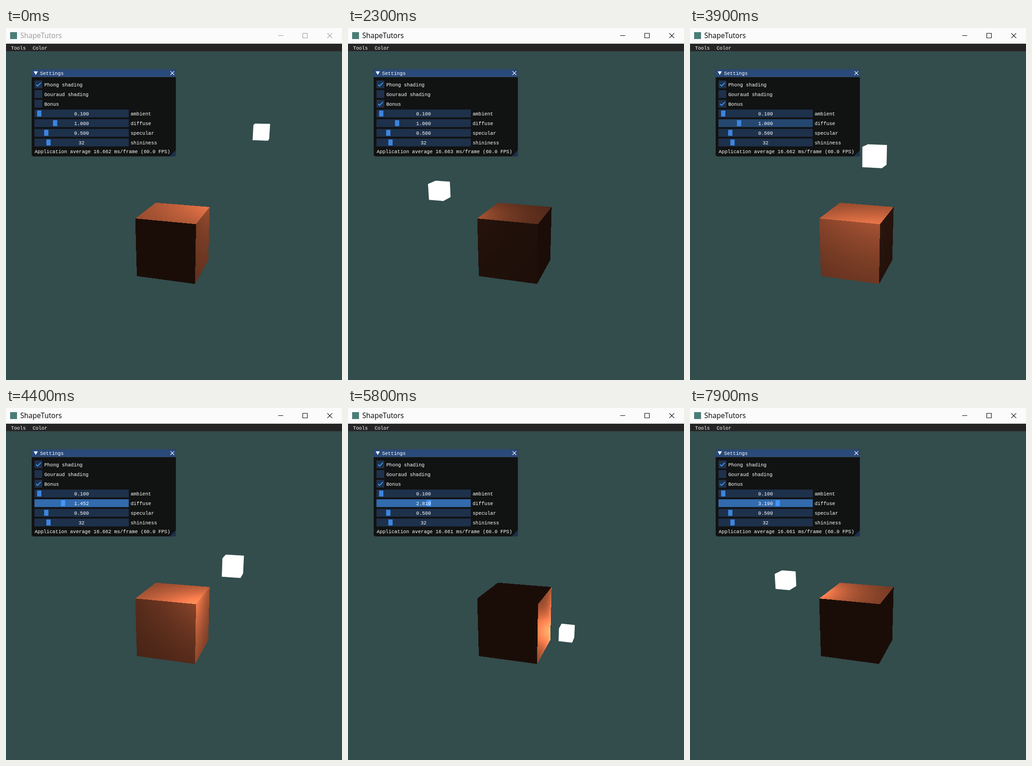
Recreate the animation shown at these times as an HTML page with a canvas. Size 732x765 px, loop 8 s.

```html
<!DOCTYPE html>
<html lang="en">
<head>
<meta charset="utf-8">
<title>Lighting demo</title>
<style>
html, body { margin: 0; width: 100%; height: 100%; overflow: hidden; background: #334c4c; }
canvas, svg { position: absolute; left: 0; top: 0; width: 732px; height: 765px; display: block; }
.mono { font: 10.7px "Liberation Mono", "DejaVu Sans Mono", monospace; fill: #fff; white-space: pre; }
.title { font: 15.5px "Open Sans", "Noto Sans", sans-serif; }
</style>
</head>
<body>
<canvas id="scene" width="732" height="765"></canvas>
<svg id="ui" viewBox="0 0 732 765">
  <rect width="732" height="34" fill="#fbfbfb"/>
  <rect x="9" y="9" width="15" height="15" fill="#4a7d78"/>
  <text id="caption" class="title" x="31" y="22">ShapeTutors</text>
  <path id="buttons" d="M593 16.5H604M646.5 11.5H656.5V21.5H646.5ZM700 11.3L710.6 21.9M710.6 11.3L700 21.9" fill="none" stroke-width="1.1"/>
  <rect y="34" width="732" height="17" fill="#242424"/>
  <path d="M0.5 51V34.5H732M0 50.5H732" fill="none" stroke="#34383c"/>
  <text class="mono" x="11" y="46.6">Tools</text>
  <text class="mono" x="58" y="46.6">Color</text>
  <rect x="55.5" y="89.5" width="315" height="190" rx="5" fill="#0f0f0f" fill-opacity=".94" stroke="#374350"/>
  <path d="M56 106.5V94.5Q56 90 60.5 90H365.5Q370 90 370 94.5V106.5Z" fill="#294a7a"/>
  <path d="M56 106.5H370" stroke="#36424f"/>
  <path d="M60.3 94.3H69.3L64.8 102Z" fill="#fff"/>
  <path d="M358.3 93.8L366.5 102M366.5 93.8L358.3 102" stroke="#fff" stroke-width="1.1"/>
  <path d="M370 265.5V276Q370 279 366 279H356.5Z" fill="#1c304c"/>
  <text class="mono" x="74.3" y="101.6">Settings</text>
  <g id="rows"></g>
  <text id="rate" class="mono" x="62.6" y="271.6"></text>
</svg>
<script>
const $ = id => document.getElementById(id);
const LOOP = 8000, STEP = 100;
const IDLE = '#1e314b', HOVER = '#25476f', ACTIVE = '#326bae';

// Settings panel rows
const checks = ['Phong shading', 'Gouraud shading', 'Bonus'];
const sliders = [['ambient', 0.1, 5], ['diffuse', 1, 5], ['specular', 0.5, 5], ['shininess', 32, 256]];
let rows = '';
checks.forEach((name, i) => {
  const y = 114 + 21 * i;
  rows += `<rect id="box${i}" x="62" y="${y}" width="17" height="17" fill="${IDLE}"/>
    <path id="tick${i}" d="M65.5 ${y + 9}L68.8 ${y + 12.2}L76 ${y + 4.8}" fill="none" stroke="#4296fa" stroke-width="1.9"/>
    <text class="mono" x="83.4" y="${y + 12.6}">${name}</text>`;
});
const grabX = (v, max) => 63.9 + 192 * v / max;
sliders.forEach(([name, v, max], i) => {
  const y = 177.3 + 21 * i;
  rows += `<rect id="bar${i}" x="62" y="${y}" width="205.5" height="17" fill="${IDLE}"/>
    <rect id="grab${i}" x="${grabX(v, max)}" y="${y + 2}" width="9.3" height="13" fill="#3d85e0"/>
    <text id="val${i}" class="mono" x="164.6" y="${y + 12.3}" text-anchor="middle">${max > 5 ? v : v.toFixed(3)}</text>
    <text class="mono" x="271.4" y="${y + 12.3}">${name}</text>`;
});
$('rows').innerHTML = rows;

// Camera
const FX = 881, FY = 885, CX = 366, CY = 400;
const yaw = 16.8 * Math.PI / 180, pitch = 16.5 * Math.PI / 180;
const [sy, cy, sp, cp] = [Math.sin(yaw), Math.cos(yaw), Math.sin(pitch), Math.cos(pitch)];
const right = [cy, 0, -sy];
const up = [-sy * sp, cp, -cy * sp];
const ahead = [-sy * cp, -sp, -cy * cp];
const dot = (a, b) => a[0] * b[0] + a[1] * b[1] + a[2] * b[2];
const blend = (r, u, d) => right.map((v, i) => v * r + up[i] * u + ahead[i] * d);
const eye = blend(-0.0031, 0.4865, -6.928);
const toWorld = (r, u, d) => blend(r, u, d).map((v, i) => v + eye[i]);
function project(p) {
  const q = p.map((v, i) => v - eye[i]), d = dot(q, ahead);
  return [CX + FX * dot(q, right) / d, CY - FY * dot(q, up) / d];
}

// Light path: a fixed spot, then a tilted orbit, in view coordinates
function lightView(t) {
  if (t < 1300) return [1.496, 1.3606, 6.92];
  const a = (90 + 0.0625 * (t - 4900)) * Math.PI / 180;
  const s = Math.sin(a), c = Math.cos(a);
  return [0.0027 + 1.1716 * s - 0.373 * c,
          -0.008 - 0.0954 * s + 0.8564 * c,
          6.62 - 0.33 * s - 1.498 * c];
}

// Piecewise linear value over time
function track(keys, t) {
  const i = keys.findIndex(k => k[0] > t);
  if (i < 0) return keys[keys.length - 1][1];
  if (i === 0) return keys[0][1];
  const [t0, a] = keys[i - 1], [t1, b] = keys[i];
  return a + (b - a) * (t - t0) / (t1 - t0);
}
const diffuseKeys = [[4100, 1], [4700, 1.9], [4900, 2.2381], [5600, 2.74], [5800, 2.8095], [6500, 2.95], [7000, 3.05], [7900, 3.1905]];
const rateKeys = [[0, 662], [400, 658], [900, 663], [1000, 662], [1700, 662], [2700, 664], [3900, 662], [4900, 662], [5800, 661]];

const ctx = $('scene').getContext('2d');
const BX = 276, BY = 374, BW = 174, BH = 188;
const patch = document.createElement('canvas');
patch.width = BW;
patch.height = BH;
const pctx = patch.getContext('2d');
const image = pctx.createImageData(BW, BH);

// Each covered pixel of the cube: its index, point, face axis and direction to the eye
const surface = [];
for (let y = 0; y < BH; y++) for (let x = 0; x < BW; x++) {
  const dir = blend((BX + x + 0.5 - CX) / FX, (CY - BY - y - 0.5) / FY, 1);
  const hits = dir.map((v, i) => (0.5 - eye[i]) / v);
  const near = Math.max(...hits), axis = hits.indexOf(near);
  const point = eye.map((v, i) => v + dir[i] * near);
  if (point.some((v, i) => i !== axis && Math.abs(v) > 0.5)) continue;
  const len = Math.hypot(...dir);
  surface.push({ at: 4 * (y * BW + x), point, axis, view: dir.map(v => -v / len) });
}

function shadeCube(light, diffuse) {
  for (const { at, point, axis, view } of surface) {
    const l = [light[0] - point[0], light[1] - point[1], light[2] - point[2]];
    const len = Math.hypot(l[0], l[1], l[2]);
    const cos = l[axis] / len;
    let sum = 0.1;
    if (cos > 0) {
      const shine = 2 * cos * view[axis] - dot(l, view) / len;
      sum += diffuse * cos + 0.5 * Math.pow(Math.max(shine, 0), 32);
    }
    image.data[at] = 255 * sum;
    image.data[at + 1] = 127.5 * sum;
    image.data[at + 2] = 79 * sum;
    image.data[at + 3] = 255;
  }
  pctx.putImageData(image, 0, 0);
}

function drawLamp(center) {
  const h = 0.125;
  const corner = n => project(center.map((v, i) => v + (n >> i & 1 ? h : -h)));
  const pts = [0, 1, 2, 3, 4, 5, 6, 7].map(corner);
  ctx.fillStyle = ctx.strokeStyle = '#fff';
  ctx.lineWidth = 0.5;
  for (const face of ['0132', '4576', '0154', '2376', '0264', '1375']) {
    ctx.beginPath();
    for (const n of face) ctx.lineTo(...pts[n]);
    ctx.closePath();
    ctx.fill();
    ctx.stroke();
  }
}

function drawScene(t, diffuse) {
  const view = lightView(t), light = toWorld(...view);
  ctx.fillStyle = '#334c4c';
  ctx.fillRect(0, 0, 732, 765);
  shadeCube(light, diffuse);
  const behind = view[2] > 6.9;
  if (behind) drawLamp(light);
  ctx.drawImage(patch, BX, BY);
  if (!behind) drawLamp(light);
}

function drawPanel(t, diffuse) {
  const focused = t >= 1200, dragging = t >= 4200;
  $('caption').setAttribute('fill', focused ? '#000' : '#999');
  $('buttons').setAttribute('stroke', focused ? '#000' : '#999');
  $('tick1').setAttribute('visibility', 'hidden');
  $('tick2').setAttribute('visibility', t >= 1300 ? 'visible' : 'hidden');
  $('box2').setAttribute('fill', t < 1200 || t >= 2200 ? IDLE : t < 1300 ? ACTIVE : HOVER);
  const over = t >= 2500 && !(t >= 3200 && t < 3500);
  $('bar1').setAttribute('fill', dragging ? ACTIVE : over ? HOVER : IDLE);
  $('grab1').setAttribute('fill', dragging ? '#4296fa' : '#3d85e0');
  $('grab1').setAttribute('x', grabX(diffuse, 5));
  $('val1').textContent = diffuse.toFixed(3);
  const ms = 16 + Math.round(track(rateKeys, t)) / 1000;
  $('rate').textContent = `Application average ${ms.toFixed(3)} ms/frame (60.0 FPS)`;
}

let shown = -1;
function frame(now) {
  const t = Math.floor(now % LOOP / STEP) * STEP;
  if (t !== shown) {
    shown = t;
    const diffuse = Math.round(track(diffuseKeys, t) * 42) / 42;
    drawScene(t, diffuse);
    drawPanel(t, diffuse);
  }
  requestAnimationFrame(frame);
}
frame(performance.now());
</script>
</body>
</html>
```
